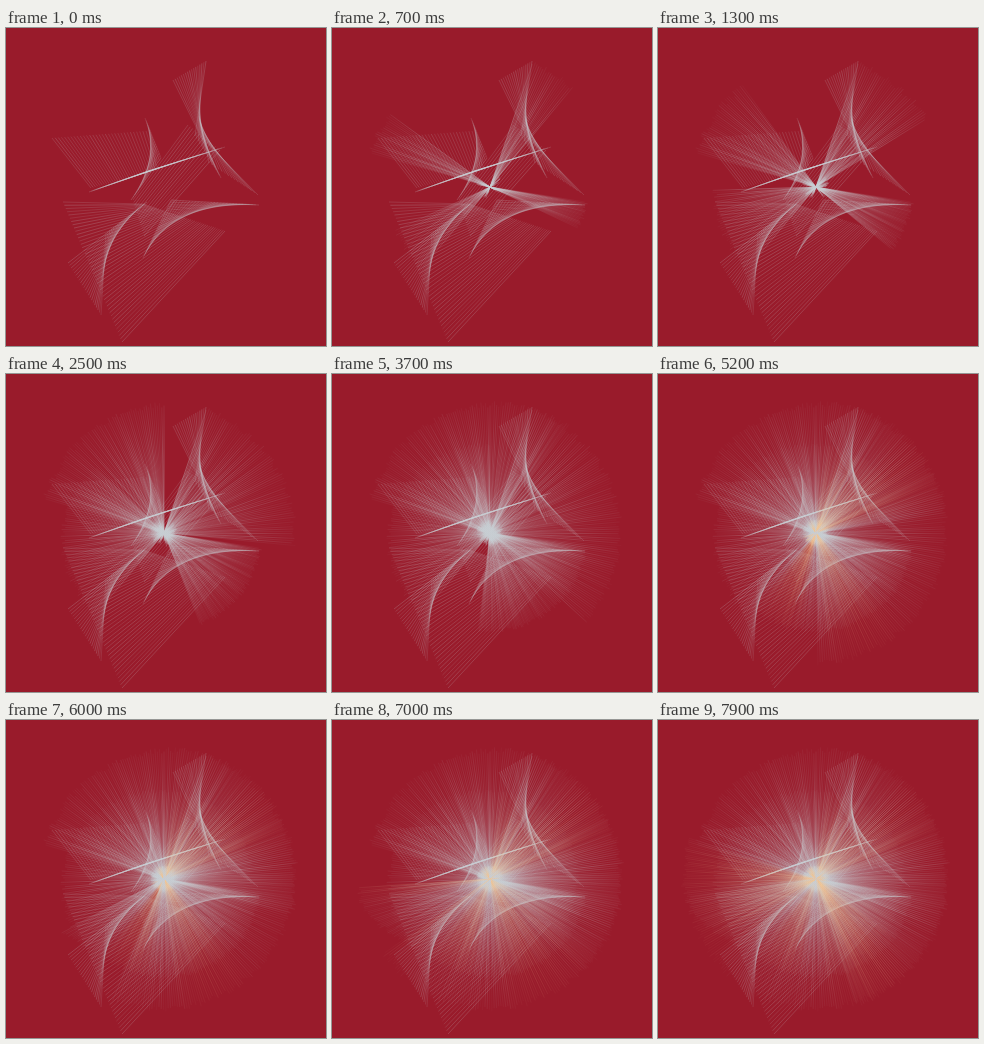
Animation of 320 by 318 pixels, one loop 8000 ms. Source, as an HTML page with a canvas:

```html
<!DOCTYPE html>
<html lang="en">
<head>
<meta charset="utf-8">
<title>Line bloom</title>
<style>
html, body { margin: 0; width: 100%; height: 100%; overflow: hidden; background: #991b2b; }
canvas { display: block; width: 320px; height: 318px; }
</style>
</head>
<body>
<canvas id="stage" width="320" height="318"></canvas>
<script>
const ctx = document.getElementById('stage').getContext('2d');
const LOOP = 8000, STEP = 100, PER_STEP = 3;
const CX = 158, CY = 159;
const COOL = [200, 206, 211], WARM = [243, 194, 143];

const mix = (a, b, k) => a + (b - a) * k;
const mixAll = (p, q, k) => p.map((v, i) => mix(v, q[i], k));
const clamp = v => Math.min(1, Math.max(0, v));
const ease = v => { const k = clamp(v); return k * k * (3 - 2 * k); };
const noise = n => { const v = Math.sin(n * 12.9898) * 43758.5453; return v - Math.floor(v); };
const rgba = (color, alpha) => `rgba(${color.map(Math.round)},${alpha})`;

function line(p, q, style) {
  ctx.strokeStyle = style;
  ctx.beginPath();
  ctx.moveTo(...p);
  ctx.lineTo(...q);
  ctx.stroke();
}

// Straight lines whose ends slide from a to b and from c to d.
function sheet(a, b, c, d) {
  const span = Math.hypot(b[0] - a[0], b[1] - a[1]) + Math.hypot(d[0] - c[0], d[1] - c[1]);
  const count = Math.round(span / 5.5);
  for (let i = 0; i <= count; i++) {
    const k = i / count;
    line(mixAll(a, b, k), mixAll(c, d, k), rgba(COOL, mix(.12, .22, noise(i + span))));
  }
}

// Tangents that outline a quadratic curve.
const arc = (a, b, c) => sheet(a, b, b, c);

function drawBase() {
  sheet([46, 110], [140, 103], [85, 160], [152, 142]);
  sheet([57, 174], [116, 314], [138, 176], [219, 203]);
  sheet([200, 33], [167, 52], [189, 108], [215, 150]);
  sheet([193, 88], [196, 110], [203, 135], [252, 167]);
  sheet([182, 97], [214, 122], [127, 172], [138, 208]);
  sheet([95, 287], [62, 235], [100, 205], [141, 174]);
  arc([83, 164], [142, 143], [219, 119]);
  arc([139, 90], [155, 130], [125, 172]);
  arc([137, 230], [165, 172], [253, 177]);
}

// Each spoke turns steadily; time in seconds, angle in degrees.
const spokes = [
  { from: 196, speed: 30, reach: t => mix(124, 132, ease(t / 4)) },
  { from: -71, speed: 31, reach: () => 130 },
  { from: 9, speed: 24, reach: t => mix(98, 133, ease((t - 5) / 2)) },
  { from: 130, speed: 38, reach: t => mix(106, 88, ease(t / 4)) }
];

function drawSpoke({ from, speed, reach }, t, seed) {
  const angle = (from + speed * t) * Math.PI / 180;
  const radius = reach(t) * mix(.97, 1.02, noise(seed + 5));
  const at = r => [CX + r * Math.cos(angle), CY + r * Math.sin(angle)];
  const warmth = Math.max(0, Math.sin((t - 3.65) / 2.9 * 2 * Math.PI)) * (t > 3.65);
  const color = mixAll(COOL, WARM, warmth);
  const alpha = mix(.1, .36, noise(seed)) * mix(1.3, .9, clamp(t / 3));

  const fade = ctx.createRadialGradient(CX, CY, 0, CX, CY, radius);
  fade.addColorStop(0, rgba(color, alpha));
  fade.addColorStop(.6, rgba(color, alpha * .75));
  fade.addColorStop(1, rgba(color, alpha * .2));
  line(at(-14 * noise(seed + 2)), at(radius), fade);
}

function draw(step) {
  ctx.fillStyle = '#991b2b';
  ctx.fillRect(0, 0, 320, 318);
  drawBase();
  for (let i = 0; i < step * PER_STEP; i++) {
    const t = i * STEP / PER_STEP / 1000;
    spokes.forEach((spoke, j) => drawSpoke(spoke, t, i * spokes.length + j));
  }
}

let shown = -1;
const start = performance.now();
function tick() {
  const step = Math.floor((performance.now() - start) % LOOP / STEP);
  if (step !== shown) draw(shown = step);
  requestAnimationFrame(tick);
}
tick();
</script>
</body>
</html>
```
